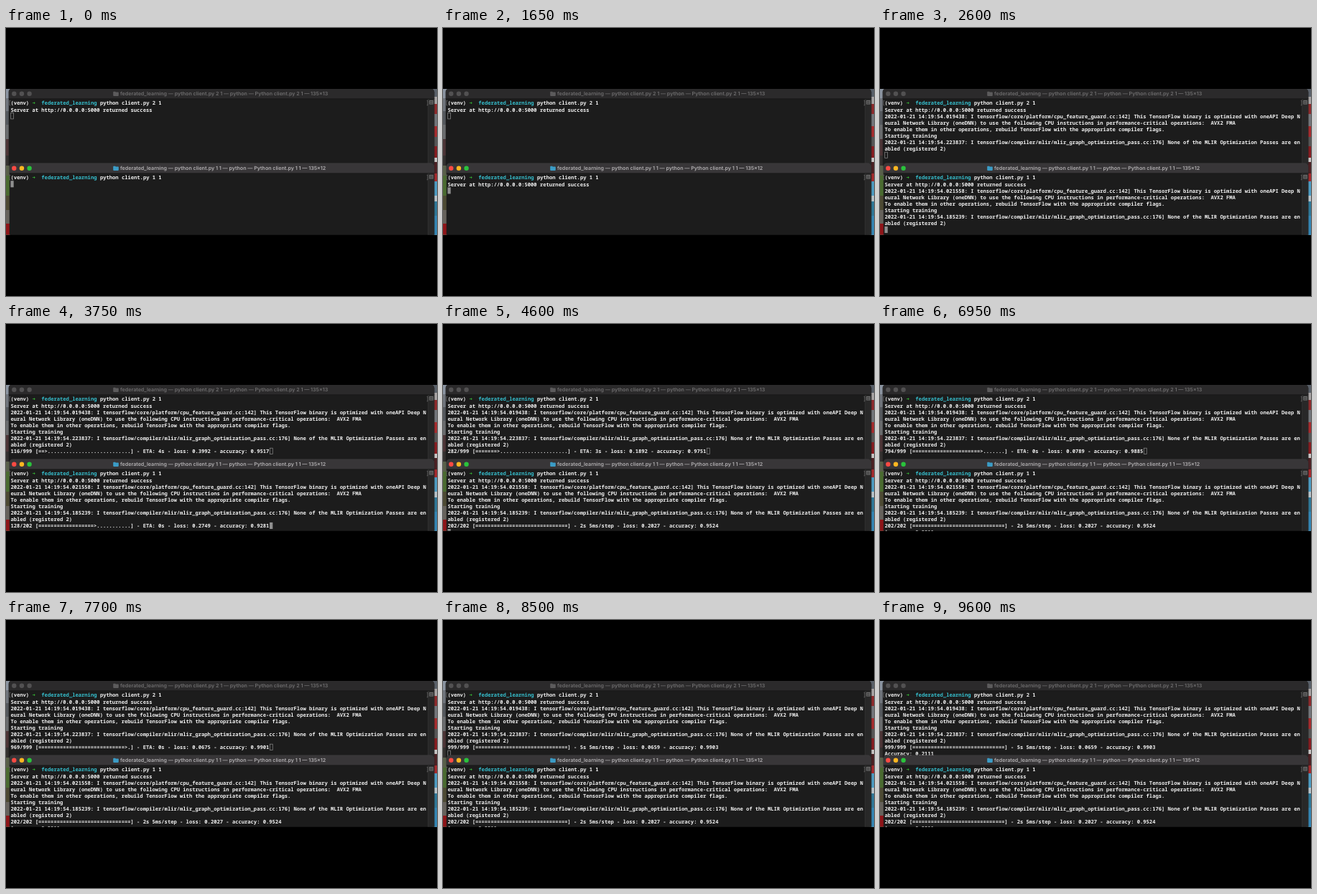
Write an HTML page with a canvas that moves like this. It is 600 px wide and 374 px high and loops after 9650 ms.

```html
<!DOCTYPE html>
<html lang="en">
<head>
<meta charset="utf-8">
<title>Federated learning clients</title>
<style>
html, body { margin: 0; width: 100%; height: 100%; overflow: hidden; background: #000; }
canvas { display: block; }
</style>
</head>
<body>
<canvas id="stage" width="600" height="374"></canvas>
<script>
const ctx = document.getElementById('stage').getContext('2d');
const LOOP = 9650, TICK = 50;
const CELL = 4.293, ROW = 9.1, LEFT = 6.4;
const MONO = '"Noto Sans Mono", "DejaVu Sans Mono", monospace';
const VIEW = { top: 85, bottom: 288.7 };

// Each progress point: time, step, loss, error rate
const clients = [
  {
    args: '2 1', rows: 13, x: 3.5, y: 84.5, height: 110, active: false,
    serverAt: 0, guardAt: 2300, startAt: 2400, passAt: 2500, resultAt: 8900,
    guard: '54.019438', pass: '54.223837', total: 999, summary: '5s 5ms/step', result: '0.2111',
    points: [[3150, 1, 2.3, 0.9], [3750, 116, 0.3992, 0.0483], [5550, 467, 0.1238, 0.0171],
             [6950, 794, 0.0789, 0.0115], [7830, 999, 0.0659, 0.0097]]
  },
  {
    args: '1 1', rows: 12, x: 4.5, y: 188.5, height: 112, active: true,
    serverAt: 600, guardAt: 2300, startAt: 2400, passAt: 2450, resultAt: 4950,
    guard: '54.021558', pass: '54.185239', total: 202, summary: '2s 5ms/step', result: '0.9811',
    points: [[3110, 1, 2.3, 0.88], [3750, 128, 0.2749, 0.0719], [4100, 202, 0.2027, 0.0476]]
  }
];

function rect(color, x, y, w, h) {
  ctx.fillStyle = color;
  ctx.fillRect(x, y, w, h);
}

function text(str, x, y, color, font) {
  ctx.font = font;
  ctx.fillStyle = color;
  ctx.fillText(str, x, y);
}

function mono(str, col, y, color = '#f1f1f1') {
  text(str, LEFT + col * CELL, y, color, `600 7.155px ${MONO}`);
}

function progressLine({ points, total, summary }, t) {
  const last = points[points.length - 1];
  let [, step, loss, error] = last;
  if (t < last[0]) {
    const i = points.findIndex(p => p[0] > t);
    const a = points[i - 1], b = points[i];
    step = Math.round(a[1] + (b[1] - a[1]) * (t - a[0]) / (b[0] - a[0]));
    const k = Math.log(step / a[1]) / Math.log(b[1] / a[1]);
    loss = a[2] * (b[2] / a[2]) ** k;
    error = a[3] * (b[3] / a[3]) ** k;
  }
  const filled = Math.floor(30 * step / total);
  const head = filled ? '='.repeat(filled - 1) + (step < total ? '>' : '=') : '';
  const state = step < total ? `ETA: ${Math.floor((total - step) * 0.0047)}s` : summary;
  return `${String(step).padStart(3)}/${total} [${head.padEnd(30, '.')}] - ${state}` +
    ` - loss: ${loss.toFixed(4)} - accuracy: ${(1 - error).toFixed(4)}`;
}

// Output below the prompt; the last entry is the line holding the cursor
function output(c, t) {
  const lines = [];
  const print = (at, ...rows) => { if (t >= at) lines.push(...rows); };
  print(c.serverAt, 'Server at http://0.0.0.0:5000 returned success');
  print(c.guardAt,
    `2022-01-21 14:19:${c.guard}: I tensorflow/core/platform/cpu_feature_guard.cc:142] This TensorFlow binary is optimized with oneAPI Deep N`,
    'eural Network Library (oneDNN) to use the following CPU instructions in performance-critical operations:  AVX2 FMA',
    'To enable them in other operations, rebuild TensorFlow with the appropriate compiler flags.');
  print(c.startAt, 'Starting training');
  print(c.passAt,
    `2022-01-21 14:19:${c.pass}: I tensorflow/compiler/mlir/mlir_graph_optimization_pass.cc:176] None of the MLIR Optimization Passes are en`,
    'abled (registered 2)');
  const begin = c.points[0][0], end = c.points[c.points.length - 1][0];
  if (t >= begin) lines.push(progressLine(c, t));
  print(c.resultAt, `Accuracy: ${c.result}`);
  if (t < begin || t >= end) lines.push('');
  return lines;
}

function folder(x, y, color) {
  ctx.fillStyle = color;
  ctx.beginPath();
  ctx.roundRect(x, y, 3.5, 3, 0.8);
  ctx.roundRect(x, y + 0.8, 7.6, 5.4, 0.8);
  ctx.fill();
}

function bracket(x, y, dir) {
  ctx.strokeStyle = '#858585';
  ctx.lineWidth = 0.6;
  ctx.beginPath();
  ctx.moveTo(x + dir, y);
  ctx.lineTo(x, y);
  ctx.lineTo(x, y + 6.5);
  ctx.lineTo(x + dir, y + 6.5);
  ctx.stroke();
}

function titleBar({ x, y, args, rows, active }) {
  rect(active ? '#383638' : '#2b2a2b', x, y, 600, 14.5);
  rect(active ? '#4b494b' : '#3a393a', x, y, 600, 0.6);
  rect('#111', x, y + 14, 600, 0.6);
  const lights = active ? ['#fb4a43', '#fdb721', '#2ac33c'] : ['#525152', '#525152', '#525152'];
  lights.forEach((color, i) => {
    ctx.fillStyle = color;
    ctx.beginPath();
    ctx.arc(11.3 + i * 10.65, y + 7.2, 3.2, 0, 7);
    ctx.fill();
  });
  folder(149.2, y + 4.2, active ? '#3b9cc6' : '#5c5b5c');
  text(`federated_learning — python client.py ${args} — python — Python client.py ${args} — 135×${rows}`,
    159, y + 9.8, active ? '#b3b1b3' : '#6f6e6f', '600 7.1px Inter, sans-serif');
}

function terminal(c, t) {
  const { x, y, height, active, args } = c;
  const baseline = y + 22.9;
  ctx.save();
  ctx.beginPath();
  ctx.roundRect(x, y, 596.3 - x, height, 5);
  ctx.clip();
  rect('#1c1c1c', x, y, 600, height);
  titleBar(c);

  rect('#282828', 587.5, y + 14.5, 10, height);
  rect('#3a3a3a', 587.2, y + 14.5, 0.5, height);
  rect('#777', 589.3, y + 16.5, 5.5, 5.5);
  rect('#333', 590, y + 17.6, 4.1, 1.2);
  rect('#333', 590, y + 19.8, 4.1, 1.2);
  bracket(5, y + 16.8, 1.2);
  bracket(587, y + 16.8, -1.2);

  mono('(venv)', 0, baseline);
  text('➜', LEFT + 7 * CELL, baseline, '#38c238', 'bold 7.13px "DejaVu Sans Mono", monospace');
  mono('federated_learning', 10, baseline, '#36c1d0');
  mono(`python client.py ${args}`, 29, baseline);

  const lines = output(c, t);
  lines.forEach((line, i) => mono(line, 0, baseline + ROW * (i + 1)));
  const cursorX = LEFT + lines[lines.length - 1].length * CELL;
  const cursorY = y + 15.6 + ROW * lines.length;
  if (active) {
    rect('#8f8f8f', cursorX, cursorY, CELL, ROW);
  } else {
    ctx.strokeStyle = '#8f8f8f';
    ctx.lineWidth = 0.7;
    ctx.strokeRect(cursorX + 0.3, cursorY + 0.3, CELL - 0.4, ROW - 0.8);
  }
  ctx.restore();
}

function strip(x, bands) {
  bands.forEach(([y, color]) => rect(color, x, y, 6, VIEW.bottom - y));
}

function desktop() {
  strip(0, [[85, '#8b94a1'], [98, '#70757c'], [116, '#54585d'], [135, '#6a6c6e'], [155, '#4c3436'],
    [178, '#33302f'], [192, '#59604a'], [206, '#4a6b30'], [234, '#4d4a33'], [254, '#66625c'], [273, '#8e1519']]);
  strip(594, [[85, '#596069'], [96, '#a8a4a4'], [106, '#8c2a2c'], [120, '#73767b'], [137, '#a52c2e'],
    [152, '#555'], [165, '#861c20'], [181, '#c9c5c4'], [187, '#4b2023'], [203, '#a42a2d'],
    [214, '#4d9cc2'], [234, '#b8c3c9'], [242, '#2f7898'], [262, '#3486b4']]);
}

function draw() {
  const t = Math.floor(performance.now() % LOOP / TICK) * TICK;
  rect('#000', 0, 0, 600, 374);
  ctx.save();
  ctx.beginPath();
  ctx.rect(0, VIEW.top, 600, VIEW.bottom - VIEW.top);
  ctx.clip();
  desktop();
  clients.forEach(c => terminal(c, t));
  ctx.restore();
  requestAnimationFrame(draw);
}

ctx.textRendering = 'geometricPrecision';
draw();
</script>
</body>
</html>
```
